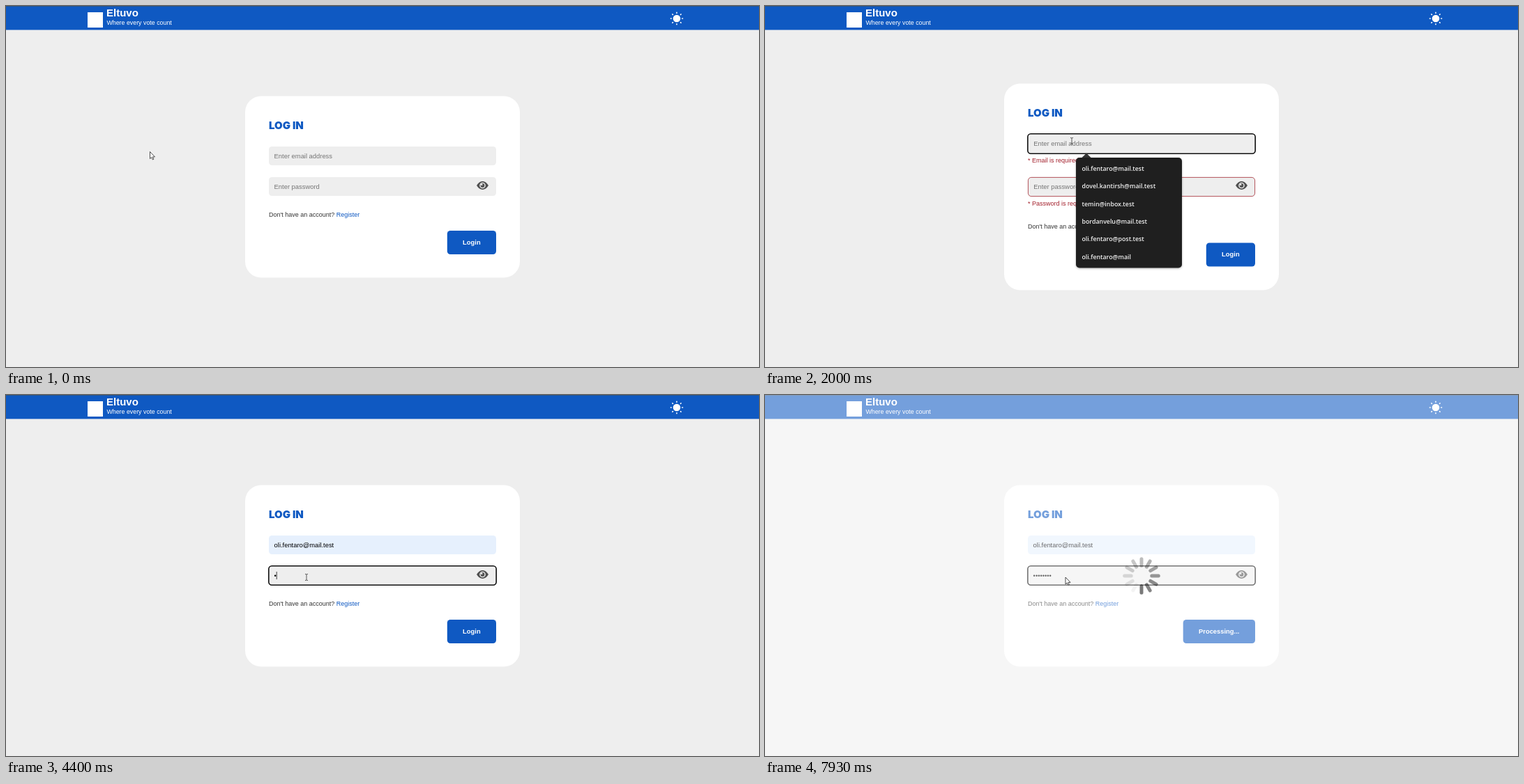
An HTML page that plays this animation: 1080x519 px, repeating every 8 s.

```html
<!DOCTYPE html>
<html lang="en">
<head>
<meta charset="utf-8">
<title>Log in</title>
<style>
  html, body { margin: 0; width: 100%; height: 100%; overflow: hidden; background: #eee; }
  svg { display: block; width: 100vw; height: 100vh; font: 9px "Liberation Sans", Arial, sans-serif; }
  .input { font-size: 9.4px; }
  .bold { font-weight: 700; }
  .title { font: 900 15px Inter, sans-serif; }
  .menu text { font: 600 8.8px "Open Sans", sans-serif; fill: #f0f0f0; }
  .error { fill: #a3202c; }
  .caret { stroke: #111; stroke-width: .8; }
</style>
</head>
<body>
<svg viewBox="0 0 1080 519" preserveAspectRatio="none">
  <rect width="1080" height="519" fill="#eee"/>
  <rect width="1080" height="34.4" fill="#0f59c2"/>
  <rect width="1080" height="1" fill="#2b5485"/>
  <g fill="#fff">
    <rect x="117" y="9" width="22" height="22"/>
    <text class="bold" x="144" y="15" style="font-size:15px">Eltuvo</text>
    <text x="144.4" y="27" style="font-size:8.85px">Where every vote count</text>
    <circle cx="962" cy="18" r="5.3"/>
    <g id="rays" stroke="#fff" stroke-width="1.6" stroke-linecap="round"/>
  </g>

  <rect id="card" x="343" width="394" rx="23" fill="#fff"/>
  <text id="title" class="title" x="377" fill="#0f59c2">LOG IN</text>

  <g id="email">
    <rect class="box" x="377" width="326" rx="4.5"/>
    <text class="input"></text>
    <line class="caret"/>
    <text class="error" x="377" y="41">* Email is required</text>
  </g>
  <g id="password">
    <rect class="box" x="377" width="326" rx="4.5"/>
    <text class="input"></text>
    <line class="caret"/>
    <text class="error" x="377" y="41">* Password is required</text>
    <g transform="translate(683.5 12)">
      <path d="M-8.5 0Q-4.8-5.9 0-5.9T8.5 0Q4.8 5.9 0 5.9T-8.5 0Z" fill="#505050"/>
      <circle r="4.3" fill="#eee"/>
      <circle r="2.9" fill="#505050"/>
      <circle cx="-1.3" cy="-1.2" r="1.3" fill="#eee"/>
    </g>
  </g>

  <text id="account" x="377" fill="#333">Don't have an account? <tspan fill="#0f59c2">Register</tspan></text>
  <g id="button">
    <rect height="34" rx="4.5"/>
    <text class="input bold" y="19.8" fill="#fff"></text>
  </g>

  <g id="menu" class="menu" style="filter:drop-shadow(0 1px 1.5px rgba(0,0,0,.3))">
    <path d="M454 218.5L461 211.8L468 218.5Z" fill="#333"/>
    <rect x="446" y="218" width="152" height="158.4" rx="5" fill="#1f1f1f"/>
    <g id="hover">
      <rect x="448.5" y="221.5" width="147" height="25" rx="3" fill="#343434"/>
      <path d="M579.5 230.8l6 6m0-6l-6 6" stroke="#eee" stroke-width="1.1"/>
    </g>
  </g>

  <rect id="veil" width="1080" height="519" fill="#fff"/>
  <g id="spinner" stroke="#000" stroke-width="5" stroke-linecap="round"/>

  <g id="cursor" stroke-linejoin="round">
    <path id="arrow" d="M0 0V10L2.3 8L3.8 11.4L5.4 10.7L3.9 7.4H7Z" fill="#fff" stroke="#222" stroke-width=".8"/>
    <path id="hand" d="M-1 .8Q0-.6 1 .8V4.6L4.4 5.4Q5.3 5.8 5.2 7L4.5 10.4L3.8 12.6H-.9L-3.6 8.6Q-4 7.3-2.7 7.2L-1 8.6Z" fill="#fff" stroke="#111" stroke-width=".7"/>
    <path id="beam" d="M-2-4.6Q-.2-4.6 0-3.8Q.2-4.6 2-4.6M0-4V4M-2 4.6Q-.2 4.6 0 3.8Q.2 4.6 2 4.6" fill="none" stroke="#444" stroke-width=".9"/>
  </g>
</svg>

<script>
const LOOP = 8000, TICK = 1000 / 15;
const ADDRESS = 'oli.fentaro@mail.test';
const SUGGESTIONS = [ADDRESS, 'dovel.kantirsh@mail.test', 'temin@inbox.test',
  'bordanvelu@mail.test', 'oli.fentaro@post.test', 'oli.fentaro@mail'];

// time, x, y of the pointer's hot spot
const PATH = [
  [0, 206.5, 209.5], [70, 206.5, 209.5], [330, 300, 246], [530, 520, 322], [670, 640, 350],
  [800, 666, 347], [930, 653, 340.5], [1135, 653, 340.5], [1270, 638, 332], [1470, 540, 262],
  [1670, 450, 204], [1800, 440, 194], [2200, 440, 194], [2500, 455, 228], [2800, 463, 237.5],
  [3000, 463, 237.5], [3070, 459, 240], [3200, 436, 252], [3400, 436, 252], [3460, 433, 253],
  [3940, 433, 253], [3990, 431, 262], [LOOP, 431, 262]
];
const SHAPES = [[0, 'arrow'], [730, 'hand'], [1330, 'arrow'], [1660, 'beam'], [2330, 'arrow'],
  [3130, 'beam'], [7730, 'arrow']];
const KEYS = [4400, 5000, 5800, 6130, 6400, 6670, 7000, 7330];
const BLINKS = [[4000, 4400], [4870, 5000], [5530, 5800]];

const $ = id => document.getElementById(id);
const clamp = v => Math.max(0, Math.min(1, v));
const ramp = (t, from, to) => clamp((t - from) / (to - from));
const within = (t, from, to) => t >= from && t < to;
const set = (el, attrs) => { for (const k in attrs) el.setAttribute(k, attrs[k]); };
const add = (parent, name, attrs) => {
  const el = document.createElementNS(parent.namespaceURI, name);
  set(el, attrs);
  return parent.appendChild(el);
};
const show = (el, on) => { el.style.display = on ? '' : 'none'; };

for (let i = 0; i < 8; i++)
  add($('rays'), 'path', { d: 'M0-7.8V-8.6', transform: `translate(962 18) rotate(${i * 45})` });
SUGGESTIONS.forEach((s, i) => {
  add($('menu'), 'text', { x: 454.5, y: 237 + 25.3 * i }).textContent = s;
});
const bars = Array.from({ length: 12 }, (_, i) =>
  add($('spinner'), 'path', { d: 'M0-14.8V-24.3', transform: `translate(540 260) rotate(${i * 30})` }));

function drawField(id, { y, text, typed, error, focus, caret, fill = '#eee' }) {
  const [box, label, bar, message] = $(id).children;
  const inset = error ? .7 : 0;
  set($(id), { transform: `translate(0 ${y})` });
  const edge = focus ? .2 : error ? -.4 : 0;
  set(box, {
    x: 377 - edge, y: -edge, width: 326 + 2 * edge, height: (error ? 28 : 27) + 2 * edge, fill,
    stroke: focus ? '#111' : error ? '#ac4048' : 'none', 'stroke-width': focus ? 1.6 : .9
  });
  label.textContent = text;
  set(label, { x: 384.6 + inset, y: 16.6 + inset, fill: typed ? '#000' : '#757575' });
  const end = 384.9 + inset + (typed ? label.getComputedTextLength() : 0);
  set(bar, { x1: end, x2: end, y1: 8 + inset, y2: 19 + inset });
  show(bar, caret);
  show(message, error);
}

function drawPointer(t) {
  const i = Math.max(1, PATH.findIndex(p => p[0] >= t));
  const [t0, x0, y0] = PATH[i - 1], [t1, x1, y1] = PATH[i];
  const k = ramp(t, t0, t1);
  set($('cursor'), { transform: `translate(${x0 + (x1 - x0) * k} ${y0 + (y1 - y0) * k})` });
  const shape = SHAPES.filter(s => s[0] <= t).pop()[1];
  for (const id of ['arrow', 'hand', 'beam']) show($(id), id === shape);
}

function draw(t) {
  const emailError = within(t, 1200, 3000), passwordError = within(t, 1200, 4400);
  const errors = emailError + passwordError;
  const top = 129.5 - 9 * errors;
  const emailY = top + 72.5;
  const passwordY = emailY + (emailError ? 62 : 44);
  const accountY = passwordY + (passwordError ? 74 : 56.5);
  const busy = t >= 7730;

  set($('card'), { y: top, height: 261 + 18 * errors });
  set($('title'), { y: top + 47.5 });
  set($('account'), { y: accountY });

  const filled = t >= 2400;
  drawField('email', {
    y: emailY, error: emailError, typed: filled, text: filled ? ADDRESS : 'Enter email address',
    focus: within(t, 1865, 3460), caret: within(t, 3000, 3460), fill: filled ? '#e6f0fd' : '#eee'
  });

  const count = KEYS.filter(k => k <= t).length;
  const blinkedOff = BLINKS.some(([a, b]) => within(t, a, b));
  drawField('password', {
    y: passwordY, error: passwordError, typed: count > 0,
    text: count ? '•'.repeat(count) : 'Enter password',
    focus: t >= 3460, caret: within(t, 3460, 7730) && !blinkedOff
  });

  const [face, label] = $('button').children;
  const light = 1 - ramp(t, 700, 900) + ramp(t, 1330, 1530);
  const left = busy ? 599.7 : 632.8;
  set($('button'), { transform: `translate(0 ${accountY + 20.5})` });
  set(face, { x: left, width: 703 - left, fill: `rgb(${[15, 89, 194].map(c => Math.round(c * light))})` });
  set(label, { x: left + 22.3 });
  label.textContent = busy ? 'Processing...' : 'Login';

  const open = t < 2900 ? ramp(t, 1860, 1995) : clamp(.67 - (t - 3000) / 220);
  const scale = 1 - (1 - open) * .055;
  set($('menu'), { opacity: open, transform: `translate(522 297) scale(${scale}) translate(-522 -297)` });
  show($('menu'), open > 0);
  show($('hover'), filled);

  const fade = ramp(t, 7670, 7930);
  set($('veil'), { opacity: .42 * fade });
  set($('spinner'), { opacity: fade });
  const head = 6 + Math.floor((t - 7925) / 83);
  bars.forEach((bar, i) => {
    const age = ((head - i) % 12 + 12) % 12;
    set(bar, { opacity: .52 * (12 - age) / 12 });
  });
  drawPointer(t);
}

const start = performance.now();
function frame() {
  const t = (performance.now() - start) % LOOP;
  draw(Math.floor((t + 4) / TICK) * TICK + .5);
  requestAnimationFrame(frame);
}
frame();
</script>
</body>
</html>
```
